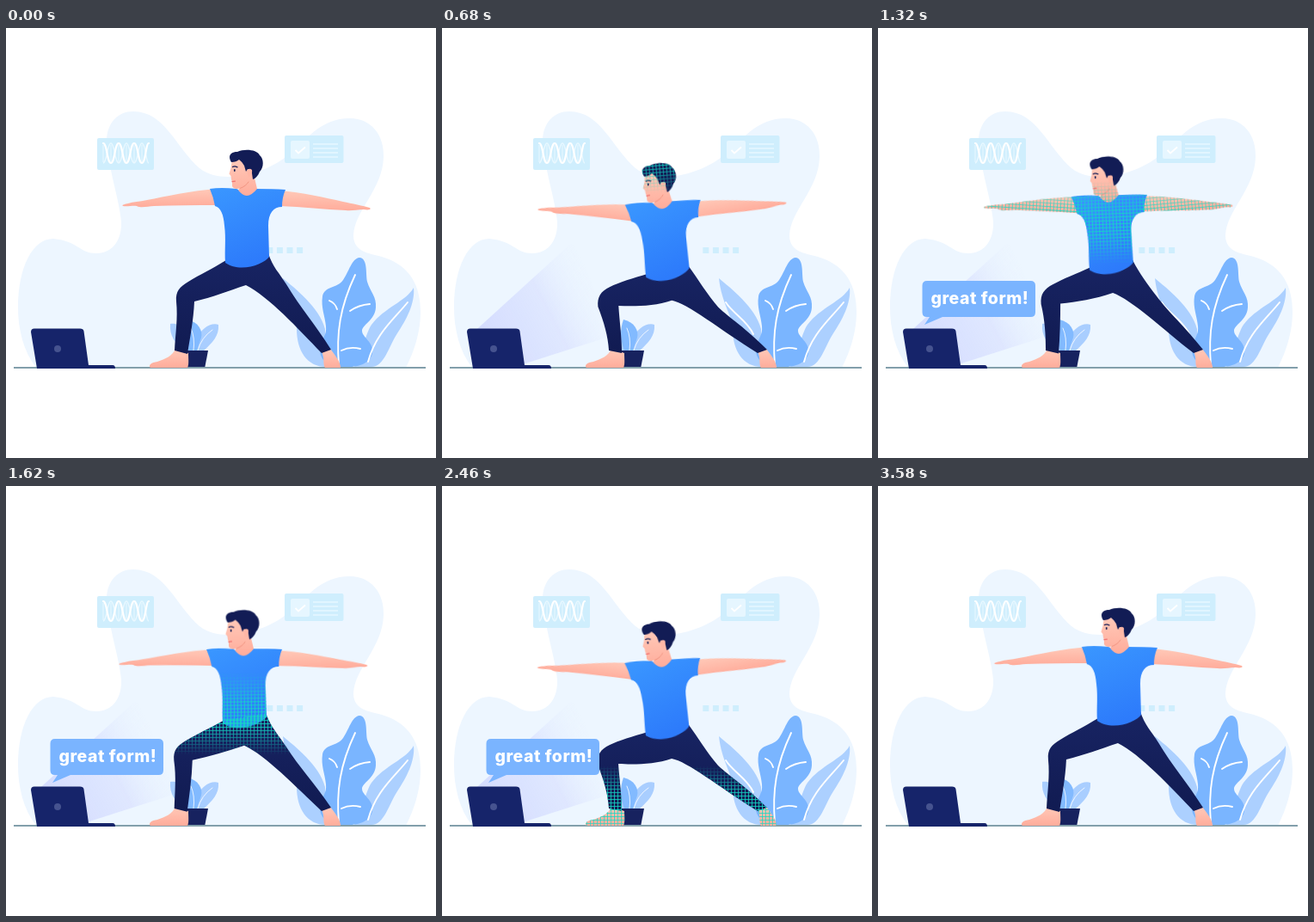
Animation of 500 by 500 pixels, one loop 3.6 s. Source, as an HTML page:

```html
<!DOCTYPE html>
<html lang="en">
<head>
<meta charset="utf-8">
<title>Yoga pose scan</title>
<style>
html, body { margin: 0; width: 100%; height: 100%; overflow: hidden; background: #fff; }
svg { display: block; width: 100vw; height: 100vh; }

/* Shared rhythm: 0 is upright, 1 is the deepest lunge */
:root {
  --sway: linear(0, .04 2.8%, .17 5.6%, .37 8.3%, .59 11.1%, .78 13.9%, .93 16.7%, .99 19.4%, 1 20.6%,
    .975 23.3%, .92 26.1%, .84 28.9%, .72 31.7%, .6 34.4%, .47 37.2%, .345 40%, .235 42.8%, .16 45%,
    .05 47.2%, 0 48.9%, .01 50%, .13 52.8%, .4 55.6%, .6 57.8%, .77 60%, .9 62.8%, .98 65.6%, 1 67.8%,
    .975 71.1%, .92 73.9%, .84 76.7%, .73 79.4%, .61 81.7%, .47 84.4%, .335 87.2%, .21 90%, .11 92.8%,
    .04 95.6%, 0);
}
.torso, .arm-l, .arm-r, .legs { animation: 3600ms var(--sway) infinite; }
.torso { animation-name: torso; transform-origin: 278px 275px; }
.arm-l { animation-name: arm-l; transform-origin: 242px 196px; }
.arm-r { animation-name: arm-r; transform-origin: 322px 199px; }
.legs { animation-name: legs; }
@keyframes torso {
  from { transform: translate(0px, 0px) rotate(0deg); }
  to { transform: translate(-18px, 15.5px) rotate(-4.5deg); }
}
@keyframes arm-l { from { transform: rotate(0deg); } to { transform: rotate(11.9deg); } }
@keyframes arm-r { from { transform: rotate(0deg); } to { transform: rotate(-6.2deg); } }
@keyframes legs {
  from { d: path("M256 270C240 280 225 287 212 295C202 301 197 306 198 318C200 338 197 355 196 375L211 379C214 360 218 340 219 318C240 313 258 306 279 299C305 312 340 350 367 378L378 374C360 345 342 325 326 298C318 285 310 278 305 262Z"); }
  to { d: path("M239 286C222 291 205 296 195 301C184 306 180 313 181 324C188 342 193 358 194 375L209 378C209 358 206 340 205 323C222 324 247 324 267 317C285 320 322 350 367 378L378 374C352 348 335 338 321 325C308 310 298 293 287 278Z"); }
}

.beam { animation: beam 3600ms linear infinite; }
@keyframes beam {
  0%, 5% { opacity: 0; }
  14%, 81% { opacity: 1; }
  89%, 100% { opacity: 0; }
}
.band { animation: band 3600ms linear infinite; }
@keyframes band { from { transform: translateY(56px); } to { transform: translateY(520px); } }

.bubble { transform-origin: 56.5px 344px; animation: bubble 3600ms ease-in-out infinite; }
@keyframes bubble {
  0%, 20% { transform: scale(0); }
  28% { transform: scale(1.11); }
  34% { transform: scale(1); }
  75% { transform: scale(1); animation-timing-function: cubic-bezier(.55, .06, .7, .25); }
  88%, 100% { transform: scale(0); }
}
.bubble text { font: 800 19.5px Inter, "Open Sans", sans-serif; letter-spacing: .5px; fill: #fff; }

.vein { fill: none; stroke: #fff; stroke-width: 1.9; stroke-linecap: round; }
.mesh path { fill: url(#grid); }
.mesh .fine { display: none; }
</style>
</head>
<body>
<svg viewBox="0 0 500 500">
  <defs>
    <linearGradient id="shirt" x1="0" y1="0" x2=".4" y2="1">
      <stop stop-color="#3a97ff"/><stop offset="1" stop-color="#2d7bfb"/>
    </linearGradient>
    <linearGradient id="skin" x1="0" y1="0" x2="0" y2="1">
      <stop stop-color="#ffc9b8"/><stop offset="1" stop-color="#ffac9b"/>
    </linearGradient>
    <linearGradient id="navy" x1="0" y1="0" x2="0" y2="1">
      <stop stop-color="#182463"/><stop offset="1" stop-color="#111b52"/>
    </linearGradient>
    <linearGradient id="light" gradientUnits="userSpaceOnUse" x1="60" y1="370" x2="182" y2="306">
      <stop stop-color="#d5ddff"/><stop offset=".55" stop-color="#dde5ff" stop-opacity=".9"/>
      <stop offset="1" stop-color="#e9f3ff" stop-opacity="0"/>
    </linearGradient>
    <linearGradient id="fade" x1="0" y1="0" x2="0" y2="1">
      <stop stop-color="#fff" stop-opacity="0"/><stop offset=".35" stop-color="#fff"/>
      <stop offset=".65" stop-color="#fff"/><stop offset="1" stop-color="#fff" stop-opacity="0"/>
    </linearGradient>
    <pattern id="grid" width="4" height="4" patternUnits="userSpaceOnUse">
      <path d="M0 .5H4M.5 0V4" style="fill:none" stroke="#14d8c4" stroke-width=".8"/>
    </pattern>
    <mask id="scan" maskUnits="userSpaceOnUse" x="0" y="0" width="500" height="500">
      <rect class="band" y="-48" width="500" height="96" fill="url(#fade)"/>
    </mask>
  </defs>

  <path fill="#edf6ff" d="M35 395C20 375 14 350 14 325C14 280 30 245 55 245C85 248 85 262 105 262C125 262 135 245 134 225C132 200 118 160 117 130C118 110 130 97 148 97C185 97 198 140 225 163C250 183 300 170 325 150C350 130 365 105 400 105C425 105 440 125 439 150C438 188 405 212 404 241C404 262 425 262 440 267C470 277 482 300 482 330C482 360 470 385 465 395Z"/>

  <g fill="none" stroke="#fff">
    <rect x="106" y="128" width="66" height="37" rx="2" fill="#cfeefd" stroke="none"/>
    <path stroke="#e9f8ff" d="M113 136v20M122 136v20M131 136v20M140 136v20M149 136v20M158 136v20"/>
    <path stroke="#e9f8ff" stroke-width="1.5" d="M113 157C117.500 157 117.500 134 122 134S126.500 157 131 157S135.500 134 140 134S144.500 157 149 157S153.500 134 158 134S162.500 157 166 157"/>
    <path stroke-width="2.2" stroke-linecap="round" d="M113 134C117.500 134 117.500 157 122 157S126.500 134 131 134S135.500 157 140 157S144.500 134 149 134S153.500 157 158 157S162.500 134 166 134"/>
    <rect x="324" y="125" width="68.500" height="32" rx="2" fill="#cfeefd" stroke="none"/>
    <rect x="331" y="131" width="22" height="21" rx="2" fill="#e6f6ff" stroke="none"/>
    <path stroke-width="1.8" d="M336.500 142l3.500 3.500 8-7"/>
    <path stroke="#e8f7ff" stroke-width="1.600" d="M357 135h29M357 140h29M357 145h29M357 150h29"/>
  </g>
  <path stroke="#cfeefd" stroke-width="7" stroke-dasharray="7 4.600" d="M303.300 258.500h42"/>

  <path class="beam" fill="url(#light)" d="M32 358L155 246L197 358L94 391Z"/>

  <path fill="#acd0ff" d="M322 291C335 302 365 325 371 350L372 394C350 394 338 375 338 350C338 335 325 320 322 291Z"/>
  <path fill="#acd0ff" d="M474 302C476 320 465 340 455 355C445 370 440 394 425 394H405C412 385 418 355 425 345C440 325 465 318 474 302Z"/>
  <path fill="#7ab5ff" d="M411 267C421 268 418 285 420 295C424 308 431 312 430 325C429 340 414 345 414 352C414 360 428 365 426 378C423 394 400 395 390 394C372 394 362 382 366 370C368 360 373 357 372 347C371 335 366 325 368 312C370 300 385 303 392 293C399 283 402 268 411 267Z"/>
  <path class="vein" d="M330 319C338 332 355 340 362 356M467 319C450 340 430 355 421 388M406 287C388 325 384 355 387 392M376 317Q383 320 385 327M400 329Q410 322 423 321M390 375Q400 370 412 373"/>

  <path fill="#a9ceff" d="M191 344C200 342 214 350 217 375H208C196 366 190 358 191 344ZM247 345C238 342 226 350 222 362L221 375H230C240 366 248 358 247 345Z"/>
  <path fill="#82baff" d="M211 339C224 342 229 352 227 360L222 375H212C207 362 207 350 211 339Z"/>
  <path class="vein" style="stroke-width:.8" d="M215 349Q220 360 218 375M240 351Q227 360 223 375"/>
  <path fill="#17225f" d="M208 375H235L231 396H210Z"/>

  <path stroke="#829fab" stroke-width="2" d="M9 395H488"/>
  <path fill="#16246a" d="M33 349.500H86Q90 349.500 90.500 352.500L96 392H124Q127 392 127 396H36L29 353.500Q29 349.500 33 349.500Z"/>
  <circle cx="60" cy="373" r="4" fill="#46538f"/>

  <g id="body">
    <path fill="url(#skin)" d="M197 373L212 378C212 385 213 391 211 395H168C165 392 169 389 176 388C185 385 194 381 197 373Z"/>
    <path fill="url(#skin)" d="M367 376L377 373C383 381 389 388 389 395H371C368 391 371 385 367 376Z"/>
    <path class="legs" fill="url(#navy)" d="M256 270C240 280 225 287 212 295C202 301 197 306 198 318C200 338 197 355 196 375L211 379C214 360 218 340 219 318C240 313 258 306 279 299C305 312 340 350 367 378L378 374C360 345 342 325 326 298C318 285 310 278 305 262Z"/>
    <g class="torso">
      <path class="arm-l" fill="url(#skin)" d="M246 187C215 189 185 196 164 200C155 202 148 202 142 204C137 205 134 206 136 207C141 208 148 206 152 207C158 210 165 207 172 207C195 206 220 206 246 206Z"/>
      <path class="arm-r" fill="url(#skin)" d="M318 189C345 191 370 197 392 202C402 204 416 207 423 209C425 211 422 212 416 211C408 211 402 213 395 212C370 211 345 208 318 207Z"/>
      <path fill="url(#shirt)" d="M237 187Q250 185 268 187Q277 193 290 187Q310 187 325 188Q321 197 321 208C311 208 305 215 305 230L306 266C300 275 272 285 255 273C254 258 256 245 254 230C253 217 250 209 243 207Q241 196 237 187Z"/>
      <path fill="url(#skin)" d="M263 152L261.500 163L259.500 169.500L261.500 172L262 176L263 179L263 184Q265 188 272 186.500L270 188.500Q280 202 292 187L288 170L282 152Z"/>
      <path fill="#121c55" d="M262 156C258 150 260 144 269 144C277 140 292 141 295 148C300 152 300 162 295 167C293 172 290 175 287 176L286 169Q286 164 281 164L279 167L277 160Q274 155 271 153Q268 156 262 156Z"/>
      <path fill="#ffb7a6" d="M280 166Q283 162 286 165Q287 170 282 174Z"/>
      <g class="fine" fill="none" stroke-linecap="round">
        <path stroke="#121c55" stroke-width="1.300" d="M263.500 161.500Q266 160.300 269 161.800"/>
        <path stroke="#121c55" stroke-width="1.700" d="M265.800 164.800v1.300"/>
        <path stroke="#f0706f" stroke-width="1.200" d="M263 178.600l3.400-.400"/>
        <path stroke="#f29683" stroke-width="1" d="M272 186.500Q279 184 282 179"/>
      </g>
    </g>
  </g>
  <g class="mesh" id="mesh" mask="url(#scan)"></g>

  <g class="bubble">
    <path fill="#7ab4ff" d="M57 294H177.500Q183 294 183 299.500V330.500Q183 336 177.500 336H75L54 345L60 336H57Q51.500 336 51.500 330.500V299.500Q51.500 294 57 294Z"/>
    <text x="61.500" y="321">great form!</text>
  </g>
</svg>
<script>
// The scan mesh is the same moving figure, filled with a grid
const figure = document.getElementById("body").cloneNode(true);
figure.removeAttribute("id");
document.getElementById("mesh").append(figure);
</script>
</body>
</html>
```
